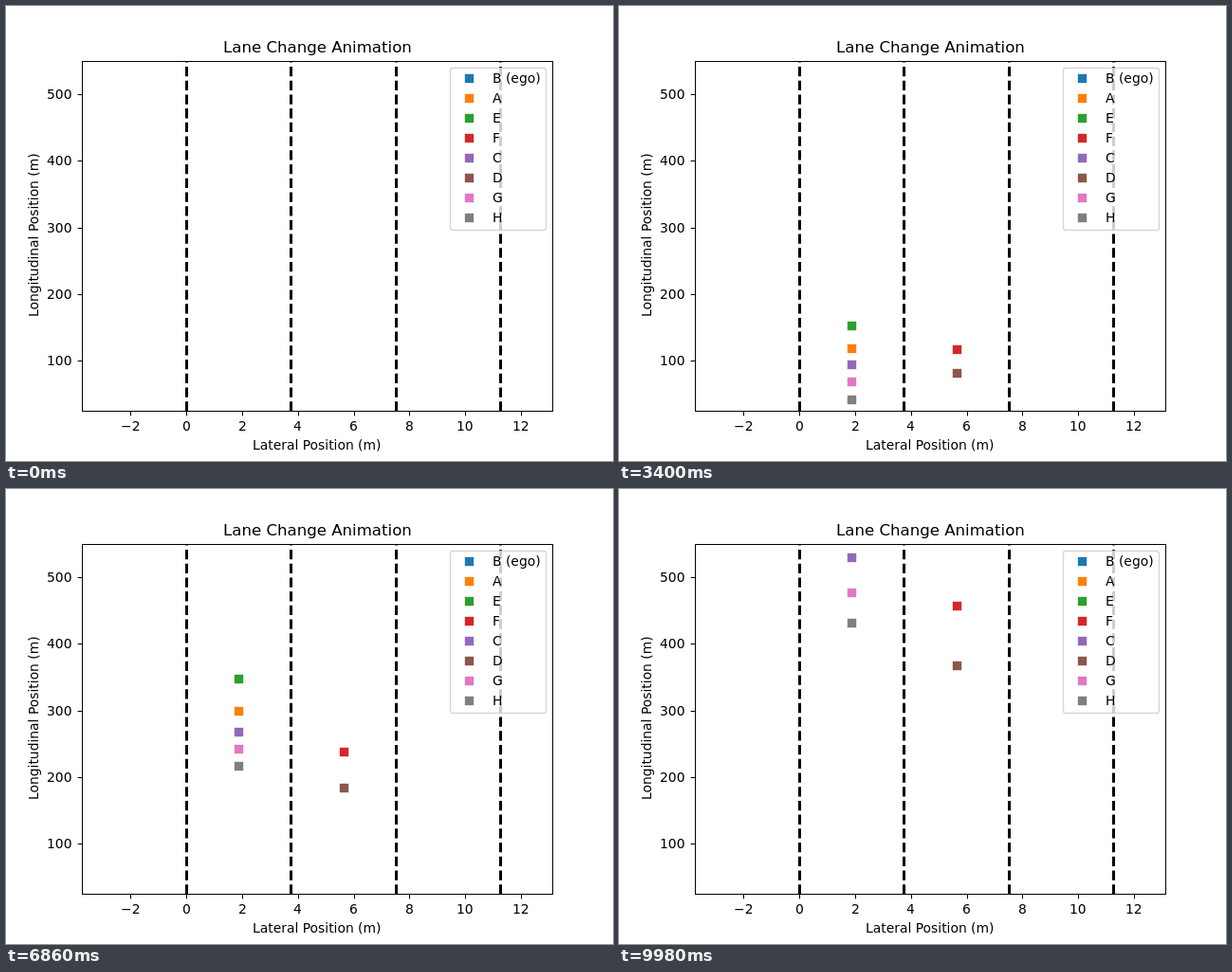
An HTML page with a canvas for the animation above (10000 ms loop, 640 px wide and 480 px high).

```html
<!DOCTYPE html>
<html lang="en">
<head>
<meta charset="utf-8">
<title>Lane Change Animation</title>
<style>
  html, body { margin: 0; width: 100%; height: 100%; overflow: hidden; background: #fff; }
  canvas { display: block; }
</style>
</head>
<body>
<canvas width="640" height="480"></canvas>
<script>
const ctx = document.querySelector('canvas').getContext('2d');
const LOOP = 10000, STEP = 20;
const LEFT = 80, RIGHT = 576, TOP = 57.6, BOTTOM = 427.2;
const LANE = 3.75, CRUISE = 29.8;

const px = m => LEFT + (m + LANE) * (RIGHT - LEFT) / 16.875;
const py = m => BOTTOM - (m - 25) * 0.704;
const snap = v => Math.floor(v + 0.5) + 0.5;

// Each car passes a few points (metres) at these times (seconds)
const times = [1.76, 3.4, 4.96, 6.86, 9.98];
const slow = LANE * 1.5, fast = LANE * 0.5;
const cars = [
  { name: 'B (ego)', color: '#1f77b4' },
  { name: 'A', color: '#ff7f0e', x: fast, via: [32.4, 119, 191.5, 299.4, 609] },
  { name: 'E', color: '#2ca02c', x: fast, via: [79, 153.1, 222.7, 347.7, 674] },
  { name: 'F', color: '#d62728', x: slow, via: [73.6, 117.6, 158.8, 238.4, 457.1] },
  { name: 'C', color: '#9467bd', x: fast, via: [-20, 94.9, 170.2, 268.2, 529.5] },
  { name: 'D', color: '#8c564b', x: slow, via: [38.1, 82.8, 120.5, 184.4, 367.6] },
  { name: 'G', color: '#e377c2', x: fast, via: [-48, 69.3, 148.9, 242.6, 477] },
  { name: 'H', color: '#7f7f7f', x: fast, via: [-92, 42.3, 126.1, 217, 431.5] }
];

// Polynomial through the points, by Lagrange's formula
function curve(via, t) {
  return via.reduce((sum, value, i) => sum + times.reduce(
    (part, other, j) => j === i ? part : part * (t - other) / (times[i] - other), value), 0);
}

function place({ x, via }, t) {
  if (!via) return [slow + 15.2 * Math.max(0, t - 1.704) ** 2, CRUISE * t];
  // Steady cruising first, then the curve
  const y = t < times[0] ? via[0] + CRUISE * (t - times[0]) : curve(via, t);
  return [x, y];
}

function marker(x, y, color) {
  ctx.fillStyle = color;
  ctx.fillRect(snap(x) - 4.695, snap(y) - 4.695, 9.39, 9.39);
}

function line(x1, y1, x2, y2) {
  ctx.beginPath();
  ctx.moveTo(x1, y1);
  ctx.lineTo(x2, y2);
  ctx.stroke();
}

// Text starts on a whole pixel; align is the share of its width left of x
function text(str, x, y, align = 0.5, size = 13.89) {
  ctx.font = `${size}px "DejaVu Sans", sans-serif`;
  ctx.fillStyle = '#000';
  ctx.fillText(str, Math.round(x - align * ctx.measureText(str).width), y);
}

function drawLanes() {
  ctx.strokeStyle = '#000';
  ctx.lineWidth = 3;
  ctx.setLineDash([10.28, 4.44]);
  for (let i = 0; i < 4; i++) {
    const x = snap(px(i * LANE));
    line(x, snap(BOTTOM), x, snap(TOP));
  }
  ctx.setLineDash([]);
}

function drawAxes() {
  ctx.lineWidth = 1;
  ctx.strokeStyle = '#000';
  ctx.strokeRect(snap(LEFT), snap(TOP), RIGHT - LEFT, snap(BOTTOM) - snap(TOP));
  for (let m = -2; m <= 12; m += 2) {
    const x = snap(px(m));
    line(x, 427.5, x, 432.4);
    text(String(m).replace('-', '\u2212'), px(m), 448);
  }
  for (let m = 100; m <= 500; m += 100) {
    const y = snap(py(m));
    line(80.5, y, 75.6, y);
    text(m, 69.8, y + 4.5, 1);
  }
  text('Lane Change Animation', 328, 49, 0.5, 16.6);
  text('Lateral Position (m)', 328, 468);
  ctx.save();
  ctx.translate(34, 242);
  ctx.rotate(-Math.PI / 2);
  text('Longitudinal Position (m)', 0, 0);
  ctx.restore();
}

function drawLegend() {
  ctx.beginPath();
  ctx.roundRect(468.5, 65.5, 101, 171, 2.8);
  ctx.fillStyle = 'rgba(255,255,255,0.8)';
  ctx.fill();
  ctx.strokeStyle = 'rgba(204,204,204,0.8)';
  ctx.lineWidth = 1.39;
  ctx.stroke();
  cars.forEach(({ name, color }, i) => {
    marker(488, 76 + 21 * i, color);
    text(name, 513, 81 + 21 * i, 0);
  });
}

function draw(ms) {
  ctx.fillStyle = '#fff';
  ctx.fillRect(0, 0, 640, 480);
  ctx.save();
  ctx.beginPath();
  ctx.rect(LEFT, 58, RIGHT - LEFT, 369);
  ctx.clip();
  drawLanes();
  if (ms > 0) for (const car of cars) {
    const [x, y] = place(car, ms / 1000);
    marker(px(x), py(y), car.color);
  }
  ctx.restore();
  drawAxes();
  drawLegend();
}

const start = performance.now();
function tick() {
  const ms = (performance.now() - start) % LOOP;
  draw(Math.floor(ms / STEP) * STEP);
  requestAnimationFrame(tick);
}
tick();
</script>
</body>
</html>
```
